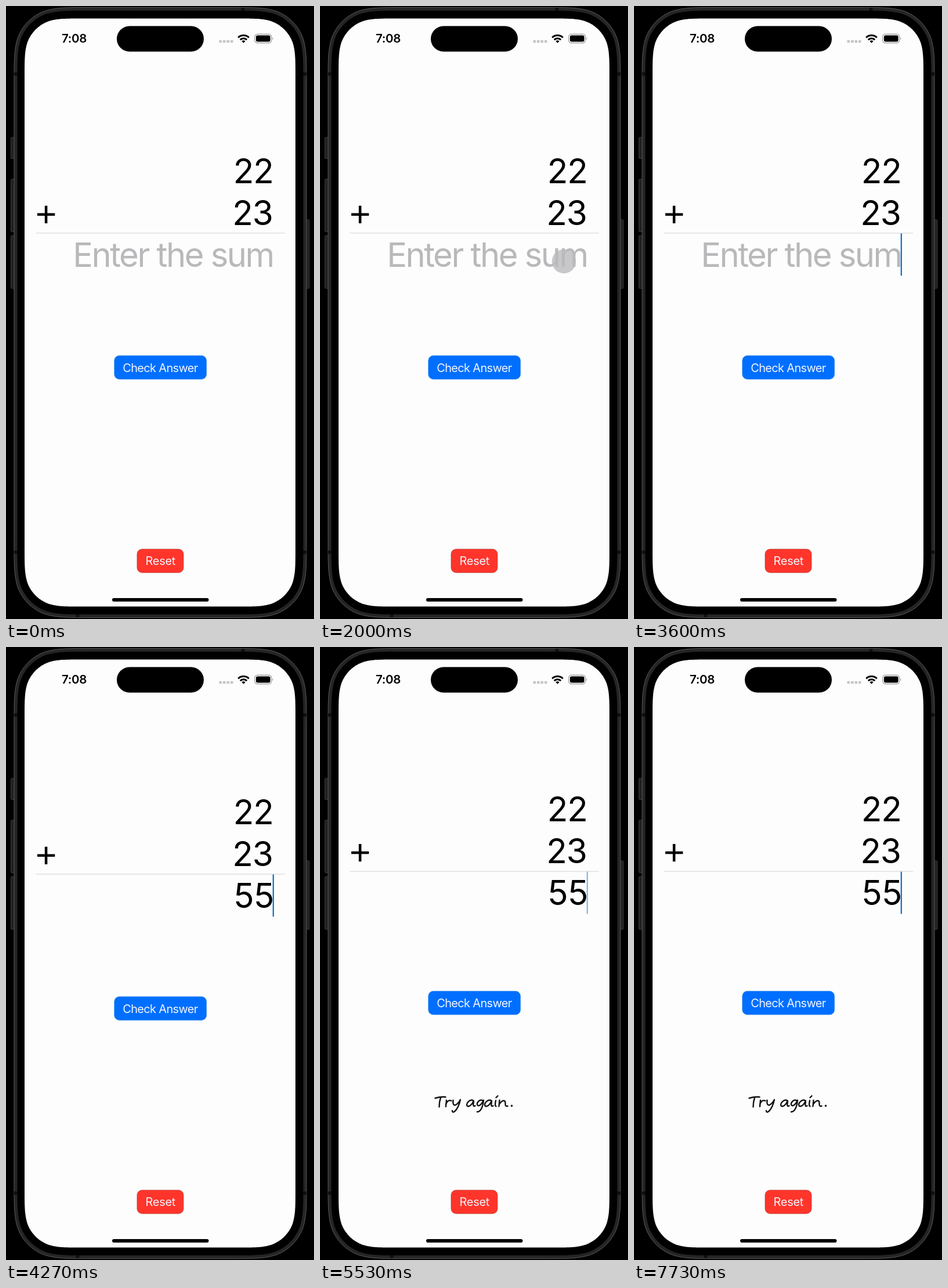
Animation of 531x1055 px, one loop 8000 ms. Source, as an HTML page:

```html
<!DOCTYPE html>
<html lang="en">
<head>
<meta charset="utf-8">
<title>Addition practice</title>
<style>
  html, body { margin: 0; width: 100%; height: 100%; overflow: hidden; background: #000; }
  svg { display: block; width: 100vw; height: 100vh; }
  text { font-family: Inter, "Liberation Sans", sans-serif; }
  .big { font-size: 58.5px; letter-spacing: -1px; text-anchor: end; }
  .hint { font-size: 58px; letter-spacing: -2.53px; text-anchor: end; fill: #b9b9bb; }
  .label { font-size: 20px; letter-spacing: -.3px; text-anchor: middle; fill: #f1f5ff; }
  .clock { font-size: 20.5px; font-weight: 600; letter-spacing: -.3px; }
  .ink { fill: none; stroke: #111; stroke-width: 2.4; stroke-linecap: round; stroke-linejoin: round; }
  .side { fill: #202020; stroke: #484848; stroke-width: .8; }
  #check .label { letter-spacing: -.68px; }
  #answer { letter-spacing: 0; }
</style>
</head>
<body>
<svg viewBox="0 0 531 1055">
  <rect width="531" height="1055"/>

  <!-- Phone body -->
  <g class="side">
    <rect x="8.5" y="226" width="7" height="36.5" rx="1.5"/>
    <rect x="8.5" y="298" width="7" height="90.5" rx="1.5"/>
    <rect x="8.5" y="395" width="7" height="91" rx="1.5"/>
    <rect x="516" y="368" width="7" height="118" rx="1.5"/>
  </g>
  <path id="frame" fill="#252525" stroke="#5a5a5a"/>
  <path d="M14 117h6M14 940h6M512 117h6M512 940h6M408.500 3v6M123.500 1046v6" stroke="#101010" stroke-width="6"/>
  <path id="bezel"/>
  <path id="screen" fill="#fdfdfd"/>

  <!-- Status bar -->
  <rect x="191" y="34.500" width="150" height="44" rx="22"/>
  <text class="clock" x="96" y="63.300">7:08</text>
  <path d="M367.500 61h24" stroke="#c6c6c8" stroke-width="4.400" stroke-dasharray="4.600 1.900"/>
  <g fill="none" stroke="#000" stroke-width="3">
    <path d="M400.300 54.300a13.200 13.200 0 0 1 18.400 0"/>
    <path d="M403.800 58.100a8.200 8.200 0 0 1 11.400 0"/>
  </g>
  <path d="M409.500 63.800l-3.100-3.200a4.600 4.600 0 0 1 6.200 0z"/>
  <rect x="428.700" y="48.300" width="29" height="15.400" rx="5" fill="none" stroke="#9b9b9d" stroke-width="1.200"/>
  <rect x="430.900" y="50.400" width="24.700" height="11.200" rx="3"/>
  <path d="M459.300 53.500q2.300 2.500 0 5z" fill="#9b9b9d"/>

  <!-- Sum -->
  <g id="sum">
    <text class="big" x="461" y="305">22</text>
    <text class="big" x="460" y="377">23</text>
    <path d="M54 358.700H84.300M69.100 343.700v30.300" stroke="#000" stroke-width="4.500"/>
    <path d="M51 390.800H481" stroke="#dcdcde" stroke-width="1.300"/>
    <text id="hint" class="hint" x="460.900" y="449">Enter the sum</text>
    <text id="answer" class="big" x="462.500" y="449"></text>
    <rect id="caret" x="459.700" y="391.300" width="2.300" height="73" rx="1" fill="#1574c6"/>
  </g>

  <g id="check">
    <rect x="186.800" y="601.800" width="158.800" height="40.500" rx="8.500" fill="#006fff" stroke="#2b86e6" stroke-width=".7"/>
    <text class="label" x="265.900" y="629.700">Check Answer</text>
  </g>

  <!-- Handwritten reply -->
  <g id="reply" class="ink" role="img" aria-label="Try again.">
    <path d="M198.500 776.500Q208 773.500 216.500 774.500M208 775.500Q205.500 783 205.500 791.500"/>
    <path d="M218 780L217 791M217 787C219 782 222 779 226.500 781"/>
    <path d="M229.500 780Q228.500 788.500 233 788.500 238 786.500 242 779 239 793 232 799.500 228 802 228 798"/>
    <path id="letterA" d="M264.500 781C259 777 251.500 785 253.500 789.500 256.500 793 262.500 787 265 781L264.200 788Q264.500 791.500 267.500 789.500"/>
    <path d="M281 781C275 777 269.500 785 271.500 788.500 274.500 791.500 279.500 786 282 780 281 791 277 800.500 271 800 267.500 799.500 269.500 796"/>
    <use href="#letterA" x="31"/>
    <path d="M303 780.500Q301 790 303.500 790.500M303.500 775.500L306.500 772.500"/>
    <path d="M309.500 780L308.500 790.500M309 787C312 782 317 779 319 782 320.500 785 317.500 791.500 323.500 790"/>
    <path d="M330.500 789.500v.2" stroke-width="3.400"/>
  </g>

  <rect x="226" y="934.800" width="80" height="40.400" rx="8.500" fill="#ff352b" stroke="#b8443c" stroke-width=".8"/>
  <text class="label" x="266.300" y="962.300">Reset</text>
  <rect x="183" y="1019" width="166.500" height="6" rx="3"/>
  <circle id="touch" fill="#bbbbbe"/>
</svg>
<script>
const LOOP = 8000;
const FIRST_DIGIT = 3930, SECOND_DIGIT = 4200, CHECKED = 5270;

// [time, opacity]
const CARET = [
  [2329, 0], [2330, 1], [2930, 1], [3070, 0], [3200, 0], [3330, 1],
  [5130, 1], [5270, 0], [5460, 0], [5600, 1],
  [6130, 1], [6270, 0], [6460, 0], [6600, 1],
  [7130, 1], [7290, 0], [7530, 0], [7700, 1]
];
const TAPS = [
  { x: 420.5, y: 439.5, r: 20.7, keys: [[1800, 0], [1900, .79], [2050, .79], [2130, 0]] },
  { x: 320.3, y: 622, r: 21.7, keys: [[4900, 0], [5000, .79], [5150, .79], [5250, 0]] }
];

const el = id => document.getElementById(id);
const [sum, hint, answer, caret, check, reply, touch] =
  ["sum", "hint", "answer", "caret", "check", "reply", "touch"].map(el);

// Half of a smooth corner, as distances along and away from the edge, in radii
const CORNER = [[1.529, 0], [1.088, 0], [.868, 0], [.631, .075], [.373, .169]];

function smoothRect(x, y, w, h, r) {
  const corner = [...CORNER, ...CORNER.map(([a, b]) => [b, a]).reverse()];
  const place = (right, bottom, flip) => {
    const points = corner.map(([a, b]) =>
      `${right ? x + w - a * r : x + a * r} ${bottom ? y + h - b * r : y + b * r}`);
    if (flip) points.reverse();
    return `${points[0]}C${points.slice(1).join(" ")}`;
  };
  return "M" + [
    place(false, false, true), place(true, false, false),
    place(true, true, true), place(false, true, false)
  ].join("L") + "Z";
}

el("frame").setAttribute("d", smoothRect(14, 2.5, 504, 1050, 83));
el("bezel").setAttribute("d", smoothRect(19.5, 8, 493, 1039, 78));
el("screen").setAttribute("d", smoothRect(32, 21.5, 467, 1012, 65));

function valueAt(keys, t) {
  const next = keys.findIndex(k => k[0] > t);
  if (next === 0) return keys[0][1];
  if (next < 0) return keys[keys.length - 1][1];
  const [t0, a] = keys[next - 1], [t1, b] = keys[next];
  return a + (b - a) * (t - t0) / (t1 - t0);
}

const show = (node, on) => node.setAttribute("visibility", on ? "visible" : "hidden");
const lift = (node, dy) => node.setAttribute("transform", `translate(0 ${dy})`);

function render(t) {
  const checked = t >= CHECKED;
  lift(sum, checked ? -4.7 : 0);
  lift(check, checked ? -9.5 : 0);
  show(reply, checked);

  show(hint, t < FIRST_DIGIT);
  const typed = t < FIRST_DIGIT ? "" : t < SECOND_DIGIT ? "5" : "55";
  if (answer.textContent !== typed) answer.textContent = typed;
  caret.setAttribute("opacity", valueAt(CARET, t));

  const tap = TAPS[t < 3000 ? 0 : 1];
  touch.setAttribute("cx", tap.x);
  touch.setAttribute("cy", tap.y);
  touch.setAttribute("r", tap.r);
  touch.setAttribute("opacity", valueAt(tap.keys, t));
}

const start = performance.now();
function tick() {
  render((performance.now() - start) % LOOP);
  requestAnimationFrame(tick);
}
tick();
</script>
</body>
</html>
```
